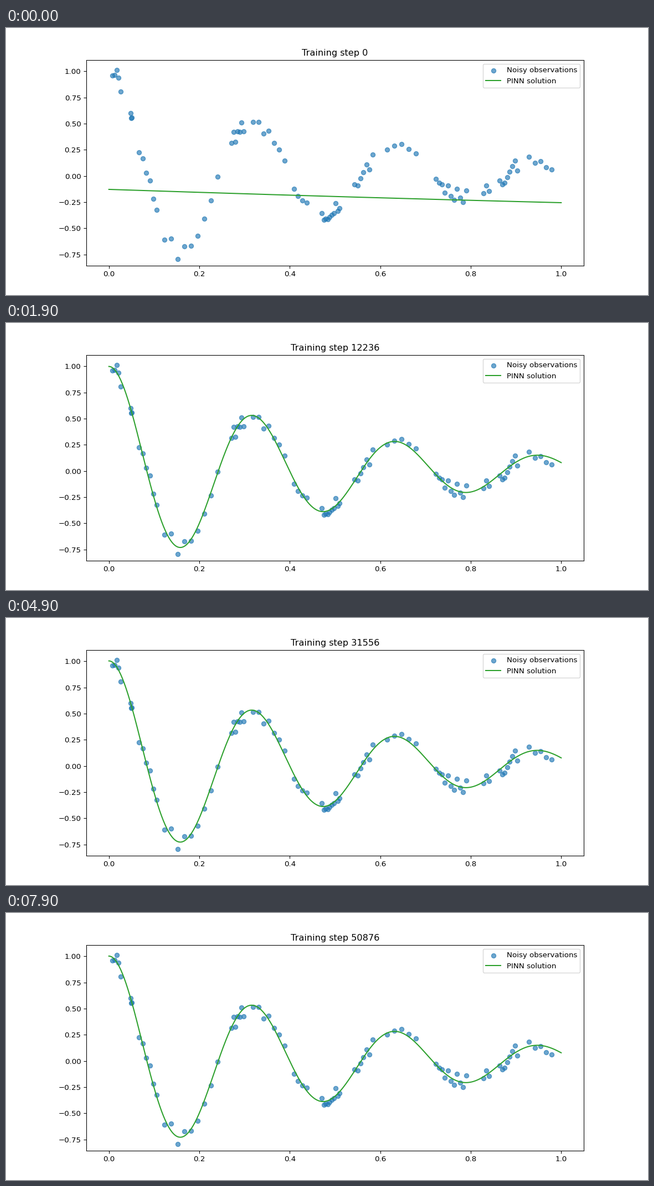
Recreate the animation shown at these times as a matplotlib script. Size 1159 by 483 pixels, loop 8000 ms.

```python
import numpy as np
import matplotlib.pyplot as plt
from matplotlib.animation import FuncAnimation

WIDTH, HEIGHT = 1159, 483
DPI = HEIGHT / 5
FRAMES, INTERVAL = 80, 100
STEPS_PER_FRAME = 644
DAMPING, OMEGA0 = 2.0, 20.0
MID = 7              # frame at which four extrema have been learned
JOIN = 0.6255        # where the learned oscillation fades into its tail

# Clumps of samples: first time, last time, count
CLUMPS = [(0.008, 0.026, 5), (0.048, 0.051, 3), (0.067, 0.106, 6),
          (0.123, 0.240, 9), (0.271, 0.298, 7), (0.319, 0.388, 7),
          (0.409, 0.437, 4), (0.471, 0.510, 10), (0.543, 0.583, 7),
          (0.615, 0.679, 5), (0.723, 0.790, 11), (0.828, 0.841, 3),
          (0.864, 0.903, 8), (0.929, 0.979, 5)]

t = np.linspace(0, 1, 500)


def oscillator(x):
    w = np.sqrt(OMEGA0**2 - DAMPING**2)
    return np.exp(-DAMPING * x) * (np.cos(w * x) + DAMPING / w * np.sin(w * x))


def observations():
    rng = np.random.default_rng(4)
    times = np.concatenate([np.linspace(*clump) for clump in CLUMPS])
    noise = np.clip(rng.normal(0, 0.04, times.size), -0.07, 0.07)
    return times, oscillator(times) + noise


def learned(x, k):
    """Oscillation known up to a front that moves right with training."""
    left = MID - k
    front = 0.74 - 0.11 * left
    gain = (0.965 - 0.01 * left) * (1 - 0.1 * x)
    return oscillator(x) * gain / (1 + np.exp((x - front) / 0.08))


def hermite(x, knots):
    """Cubic through (position, value, slope) knots."""
    px, pv, ps = np.array(knots).T
    i = np.clip(np.searchsorted(px, x) - 1, 0, len(px) - 2)
    h = px[i + 1] - px[i]
    f = (x - px[i]) / h
    return (pv[i] * (2 * f**3 - 3 * f**2 + 1) + pv[i + 1] * (3 * f**2 - 2 * f**3)
            + h * ps[i] * (f**3 - 2 * f**2 + f) + h * ps[i + 1] * (f**3 - f**2))


TAIL = [(JOIN, learned(JOIN, MID), 0), (0.722, -0.01, -1.8),
        (0.813, -0.095, 0), (1, 0.078, 1.2)]
HALF_TRAINED = np.where(t < JOIN, learned(t, MID), hermite(t, TAIL))
EXACT = oscillator(t)


def solution(k):
    if k == 0:
        return -0.128 - 0.145 * t + 0.018 * t**2
    if k < MID:
        return learned(t, k)
    rest = np.exp(-(k - MID) / 2.2)
    wobble = 0.001 + 0.003 * np.cos(2 * np.pi * 7 * (k - 41) / 18)
    settled = EXACT + wobble * (1 - 1.5 * t)
    return settled + rest * (HALF_TRAINED - settled)


fig, ax = plt.subplots(figsize=(WIDTH / DPI, HEIGHT / DPI), dpi=DPI)
ax.scatter(*observations(), color="tab:blue", alpha=0.65,
           label="Noisy observations")
line, = ax.plot(t, solution(0), color="tab:green", label="PINN solution")
ax.set_xlim(-0.05, 1.05)
ax.set_ylim(-0.856, 1.107)
ax.legend(loc="upper right")
title = ax.set_title("Training step 0")


def update(k):
    line.set_ydata(solution(k))
    title.set_text(f"Training step {k * STEPS_PER_FRAME}")
    return line, title


anim = FuncAnimation(fig, update, frames=FRAMES, interval=INTERVAL,
                     repeat=True, repeat_delay=0, blit=False)
plt.show()
```
